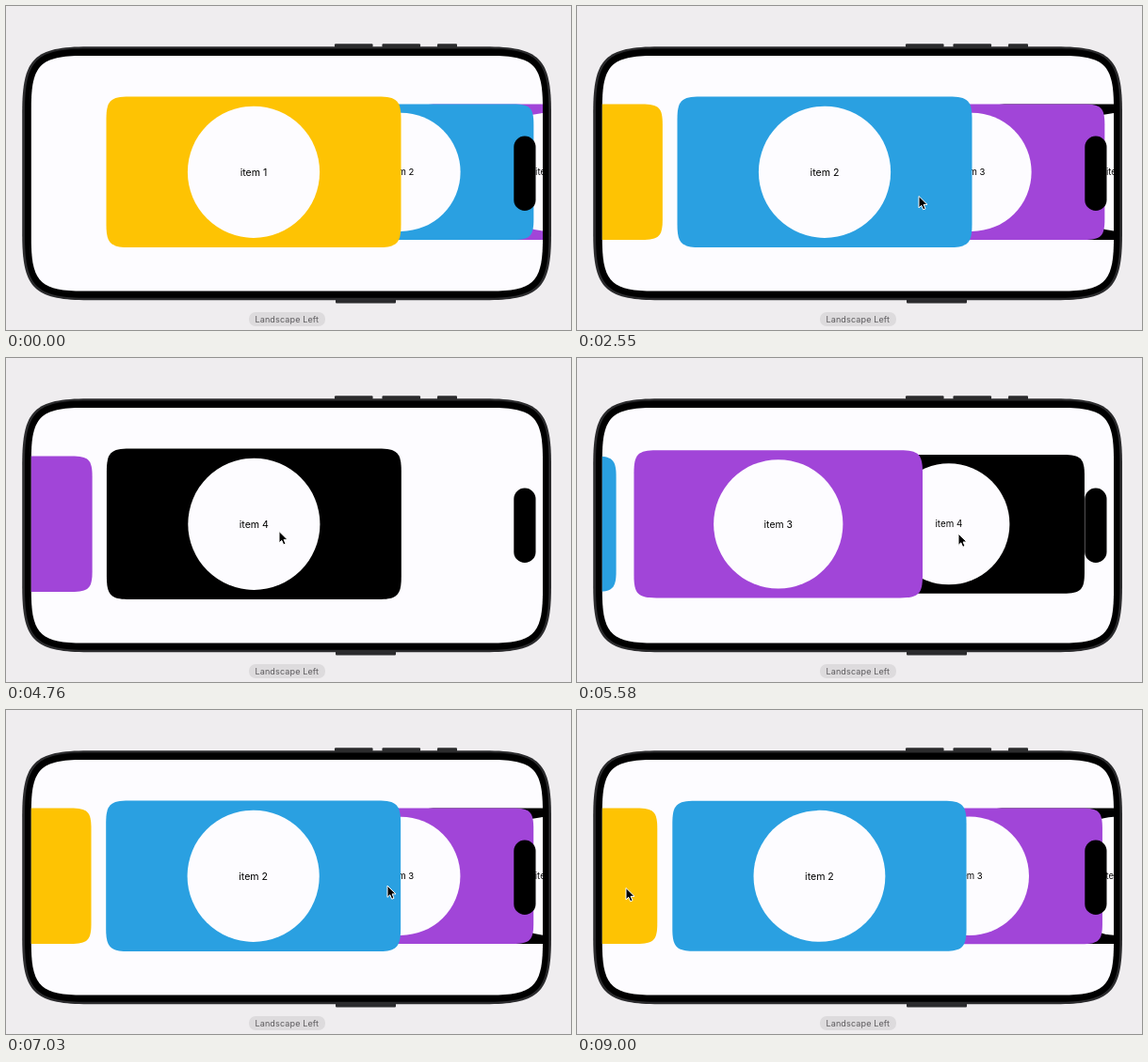
Write an HTML page that moves like this. It is 600 px wide and 345 px high and loops after 9030 ms.

```html
<!DOCTYPE html>
<html lang="en">
<head>
<meta charset="utf-8">
<title>Card carousel</title>
<style>
  html, body { margin: 0; width: 100%; height: 100%; overflow: hidden; background: #efedef; }
  svg { display: block; width: 600px; height: 345px; }
  text { font-family: Inter, sans-serif; text-anchor: middle; }
</style>
</head>
<body>
<svg viewBox="0 0 600 345">
  <defs>
    <clipPath id="screen"><path id="glass"/></clipPath>
  </defs>
  <rect width="600" height="345" fill="#efedef"/>
  <g fill="#2b2b2d">
    <rect x="349" y="40.2" width="40.5" height="6" rx="1"/>
    <rect x="399.5" y="40.2" width="40.5" height="6" rx="1"/>
    <rect x="458" y="40.2" width="21" height="6" rx="1"/>
    <rect x="350" y="310" width="64" height="6.4" rx="1"/>
  </g>
  <path id="body" fill="#2b2b2d"/>
  <path id="bezel" fill="#000"/>
  <g clip-path="url(#screen)">
    <rect x="26" y="52" width="545" height="253" fill="#fdfcff"/>
    <g id="cards"></g>
    <rect x="539.3" y="138.5" width="23.2" height="79.5" rx="11.6" fill="#000"/>
  </g>
  <rect x="258" y="326" width="81" height="15" rx="7" fill="#dddbdd"/>
  <text x="298.3" y="336.7" font-size="9" letter-spacing="0.15" fill="#5c5a5d">Landscape Left</text>
  <path id="cursor" d="M0 0V12.4L2.8 9.8 4.7 14.3 7 13.3 5.1 8.9H9Z" fill="#000"
        stroke="#fff" stroke-width="1" stroke-linejoin="round"/>
</svg>
<script>
const LOOP = 9030, CX = 263, CY = 176.8, W = 313, H = 160.5;
const RATE = 0.01, SCALE_LAG = 36;
const REACH = 112, DRAG = 125, APPROACH = 220, LEFT_LIMIT = 27;
const COLORS = ['#fec303', '#2aa0e1', '#a145d8', '#000'];

// Each flick turns one page and leaves the pointer where it was released
const FLICKS = [
  { at: 1300, dir: 1, x: 363, y: 202.5 },
  { at: 2780, dir: 1, x: 342.5, y: 202.5 },
  { at: 3930, dir: 1, x: 290, y: 184.5 },
  { at: 5250, dir: -1, x: 405, y: 187 },
  { at: 6115, dir: -1, x: 405, y: 187 },
  { at: 7535, dir: 1, x: 203, y: 186.5 },
  { at: 8404, dir: -1, x: 52, y: 189.5 }
];
const ENTRY = { x: 455, y: 350 };

const $ = id => document.getElementById(id);
const clamp = (v, a, b) => Math.min(b, Math.max(a, v));
const mix = (a, b, u) => a + (b - a) * u;

function ease(u) {
  u = clamp(u, 0, 1);
  return u * u * (3 - 2 * u);
}

// Critically damped step response
function spring(ms) {
  const k = Math.max(0, ms * RATE);
  return 1 - (1 + k) * Math.exp(-k);
}

const scrollAt = t => FLICKS.reduce((s, f) => s + f.dir * spring(t - f.at), 0);

// Approach the start of each drag, then drag against the scroll direction
function pointerAt(t) {
  let { x, y } = ENTRY;
  for (const f of FLICKS) {
    const near = ease((t - f.at + APPROACH) / APPROACH);
    const start = Math.max(LEFT_LIMIT, f.x + f.dir * REACH);
    x = mix(mix(x, start, near), f.x, ease((t - f.at) / DRAG));
    y = mix(y, f.y, near);
  }
  return [x, y];
}

// Rectangle with continuous-curvature corners
function smoothRect(x, y, w, h, r) {
  const e = 1.528 * r, c = 0.27 * r, R = x + w, B = y + h;
  return `M${x + e} ${y}H${R - e}C${R - c} ${y} ${R} ${y + c} ${R} ${y + e}` +
    `V${B - e}C${R} ${B - c} ${R - c} ${B} ${R - e} ${B}` +
    `H${x + e}C${x + c} ${B} ${x} ${B - c} ${x} ${B - e}` +
    `V${y + e}C${x} ${y + c} ${x + c} ${y} ${x + e} ${y}Z`;
}

function make(tag, attrs, parent) {
  const el = document.createElementNS('http://www.w3.org/2000/svg', tag);
  for (const name in attrs) el.setAttribute(name, attrs[name]);
  return parent.appendChild(el);
}

$('body').setAttribute('d', smoothRect(17.2, 43.2, 561.8, 270, 46));
$('bezel').setAttribute('d', smoothRect(20, 45.6, 556.4, 265.2, 43.5));
$('glass').setAttribute('d', smoothRect(26.8, 53, 543.2, 250.5, 36));

// The first item lies on top, so each later card goes underneath
const cards = COLORS.map((fill, i) => {
  const g = make('g', {}, $('cards'));
  make('path', { d: smoothRect(-W / 2, -H / 2, W, H, 16), fill }, g);
  make('circle', { r: 70.1, fill: '#fdfcff' }, g);
  make('text', { y: 3.9, 'font-size': 10.6 }, g).textContent = 'item ' + (i + 1);
  $('cards').prepend(g);
  return g;
});

function draw(t) {
  const pos = scrollAt(t), late = scrollAt(t - SCALE_LAG);
  cards.forEach((g, i) => {
    const d = i - pos;
    const x = CX + W * (d > 0 ? d / 2 : d);
    const s = 1 - 0.1 * Math.min(1, Math.abs(i - late));
    g.setAttribute('transform', `translate(${x} ${CY}) scale(${s})`);
  });
  $('cursor').setAttribute('transform', `translate(${pointerAt(t).join(' ')})`);
}

const origin = performance.now();
function tick() {
  draw((performance.now() - origin) % LOOP);
  requestAnimationFrame(tick);
}
draw(0);
requestAnimationFrame(tick);
</script>
</body>
</html>
```
